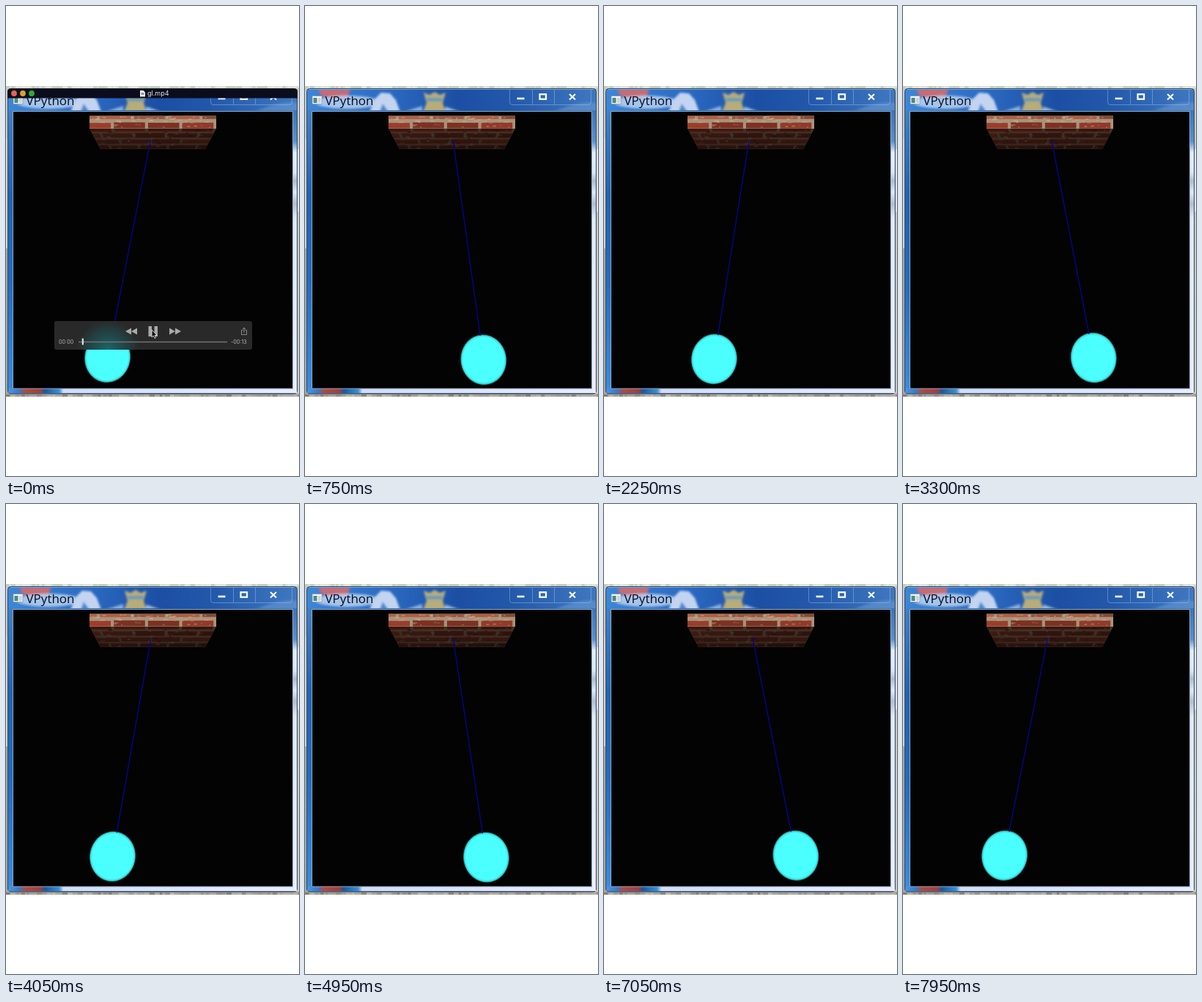
An HTML page for the animation above (8000 ms loop, 400 by 640 pixels).

```html
<!DOCTYPE html>
<html lang="en">
<head>
<meta charset="utf-8">
<title>Pendulum</title>
<style>
  html, body { margin: 0; width: 100%; height: 100%; overflow: hidden; background: #fff; }
  svg { display: block; width: 400px; height: 640px; }
  .title { font: 17px "Open Sans", "Noto Sans", sans-serif; fill: #060d20; }
  .small { font: 7.2px Inter, "Liberation Sans", sans-serif; fill: #b4b4b4; }
  .file { font: 9px Inter, "Liberation Sans", sans-serif; fill: #e4e4e8; }
</style>
</head>
<body>
<svg viewBox="0 0 400 640" xmlns="http://www.w3.org/2000/svg">
  <defs>
    <linearGradient id="bar">
      <stop offset="0" stop-color="#3c86d8"/>
      <stop offset=".3" stop-color="#2a68c0"/>
      <stop offset=".52" stop-color="#1c4fa4"/>
      <stop offset=".7" stop-color="#2257aa"/>
      <stop offset="1" stop-color="#3f78c0"/>
    </linearGradient>
    <linearGradient id="left" x2="0" y2="1">
      <stop offset="0" stop-color="#4080c8"/>
      <stop offset=".3" stop-color="#2264b4"/>
      <stop offset=".6" stop-color="#246cc0"/>
      <stop offset="1" stop-color="#3c8ce0"/>
    </linearGradient>
    <linearGradient id="right" x2="0" y2="1">
      <stop offset="0" stop-color="#3c74bc"/>
      <stop offset=".11" stop-color="#5a90d0"/>
      <stop offset=".15" stop-color="#e4eef8"/>
      <stop offset=".22" stop-color="#dce6f2"/>
      <stop offset=".25" stop-color="#b0bccc"/>
      <stop offset=".29" stop-color="#e2e8f2"/>
      <stop offset=".33" stop-color="#b4bece"/>
      <stop offset=".38" stop-color="#e2e8f2"/>
      <stop offset="1" stop-color="#ececf8"/>
    </linearGradient>
    <linearGradient id="base">
      <stop offset="0" stop-color="#4a94e0"/>
      <stop offset=".035" stop-color="#3878c8"/>
      <stop offset=".055" stop-color="#b8483c"/>
      <stop offset=".11" stop-color="#a83c38"/>
      <stop offset=".125" stop-color="#1c589c"/>
      <stop offset=".175" stop-color="#3c90d4"/>
      <stop offset=".19" stop-color="#d4dcf4"/>
      <stop offset="1" stop-color="#eeecfa"/>
    </linearGradient>
    <linearGradient id="shade" x2="0" y2="1">
      <stop offset="0" stop-color="#000" stop-opacity=".12"/>
      <stop offset="1" stop-color="#000" stop-opacity=".4"/>
    </linearGradient>
    <radialGradient id="skin">
      <stop offset=".88" stop-color="#4cffff"/>
      <stop offset=".95" stop-color="#3cdcdc"/>
      <stop offset="1" stop-color="#0c5050"/>
    </radialGradient>
    <radialGradient id="glow">
      <stop offset="0" stop-color="#1a7274" stop-opacity=".85"/>
      <stop offset=".5" stop-color="#1c5c60" stop-opacity=".6"/>
      <stop offset="1" stop-color="#1c5c60" stop-opacity="0"/>
    </radialGradient>
    <filter id="soft" x="-30%" y="-30%" width="160%" height="160%"><feGaussianBlur stdDeviation="1.800"/></filter>
    <filter id="grain" x="-5%" y="-5%" width="110%" height="110%"><feGaussianBlur stdDeviation=".5"/></filter>
    <clipPath id="head"><rect x="3" y="114" width="394" height="28"/></clipPath>
    <clipPath id="view"><rect x="10" y="144" width="381" height="377"/></clipPath>
    <clipPath id="panel"><rect x="66" y="429" width="270" height="39" rx="3"/></clipPath>
  </defs>

  <!-- desktop -->
  <rect y="109" width="400" height="423" fill="#c8cac0"/>
  <rect y="109" width="400" height="3" fill="#dcded0"/>
  <rect y="180" width="3" height="150" fill="#d6d2c4"/>
  <rect y="330" width="3" height="198" fill="#a8a898"/>
  <rect x="398" y="195" width="2" height="85" fill="#dce4ec"/>
  <rect y="528" width="400" height="4" fill="#a9a598"/>
  <g id="litter"></g>

  <!-- window frame -->
  <rect x="2.500" y="112.500" width="395" height="415.500" rx="4" fill="url(#bar)" stroke="#2c4a6c"/>
  <rect x="3" y="142" width="7" height="385" fill="url(#left)"/>
  <rect x="391" y="142" width="6" height="385" fill="url(#right)"/>
  <rect x="4" y="520" width="392" height="7" fill="url(#base)"/>
  <g clip-path="url(#head)">
    <g filter="url(#soft)">
      <path d="M18 113H62L58 124L36 126L22 122Z" fill="#c46c78"/>
      <ellipse cx="58" cy="131" rx="44" ry="9" fill="#c4d8f2" opacity=".8"/>
      <path d="M88 144L96 126L104 118L116 119L124 128L130 144Z" fill="#c2d4f0"/>
      <path d="M102 144L106 133L114 144Z" fill="#4c88d4"/>
      <path d="M135 144L160 136V146Z" fill="#86aee0"/>
      <path d="M162 118L170 121L177 117L184 121L192 118L188 132L192 144H161L166 132Z" fill="#b8ac78"/>
      <path d="M166 125H188V130H166Z" fill="#6c9cb0"/>
      <path d="M192 137L212 144H190Z" fill="#98b8e0"/>
      <path d="M336 146Q372 128 400 132V146Z" fill="#6698d4" opacity=".6"/>
    </g>
  </g>
  <path d="M6 113.500H394" stroke="#a8cdf0" stroke-opacity=".6"/>
  <g fill="none" stroke="#b4d0ee" stroke-opacity=".4">
    <path d="M279.500 114V131Q279.500 134.500 283 134.500H387Q390.500 134.500 390.500 131V114M310.500 114V134M340.500 114V134"/>
  </g>
  <g fill="none" stroke="#f8fbff">
    <path d="M289.500 126H299.500" stroke-width="2.600"/>
    <rect x="320.500" y="120.200" width="8.500" height="6.600" stroke-width="2.300"/>
    <path d="M361 120L369 127.500M369 120L361 127.500" stroke-width="2.200"/>
  </g>
  <rect x="10" y="122.500" width="13" height="11" fill="#f2f4f4" stroke="#8796a4" stroke-width=".8"/>
  <rect x="11.500" y="125" width="5" height="7" fill="#4c8c80"/>
  <rect x="18" y="125" width="3.500" height="7" fill="#c9d2d6"/>
  <text class="title" x="27.500" y="134.500">VPython</text>
  <rect x="9.500" y="143.500" width="382" height="377.500" fill="#030303" stroke="#88acc4"/>

  <!-- scene -->
  <g clip-path="url(#view)">
    <g id="bricks" filter="url(#grain)"></g>
    <ellipse id="ball" rx="31.500" ry="34.500" fill="url(#skin)"/>
    <path id="rod" stroke="#05058c" stroke-width="1.400" fill="none"/>
  </g>

  <!-- player controls -->
  <g id="player">
    <path d="M2 125.500V117Q2 112.500 6 112.500H394Q398 112.500 398 117V125.500Z" fill="#0b0d1c"/>
    <circle cx="11" cy="119" r="3.900" fill="#ee5f56"/>
    <circle cx="23" cy="119" r="3.900" fill="#dca032"/>
    <circle cx="35" cy="119" r="3.900" fill="#30a83c"/>
    <path d="M183 115H187.500L190 117.500V123.500H183Z" fill="#f0f0f0"/>
    <rect x="184.500" y="118" width="4" height="3" fill="#8898a8"/>
    <text class="file" x="193" y="122.300">gl.mp4</text>
    <g clip-path="url(#panel)">
      <rect x="66" y="429" width="270" height="39" fill="#292929"/>
      <ellipse cx="139" cy="468" rx="43" ry="40" fill="url(#glow)"/>
    </g>
    <g fill="#a9a9a9">
      <path d="M171 438.500V447.500L163 443ZM179 438.500V447.500L171 443Z"/>
      <path d="M223 438.500V447.500L231 443ZM231 438.500V447.500L239 443Z"/>
      <path d="M194.500 436H199V450H194.500ZM202.500 436H207V450H202.500Z"/>
    </g>
    <path d="M323.500 441.500H321.500V447.500H328.500V441.500H326.500M325 445V438M323 440L325 438L327 440" fill="none" stroke="#959595" stroke-width=".9"/>
    <path d="M99 457.500H302" stroke="#717171" stroke-width="1.500"/>
    <rect x="103.700" y="452.500" width="2.300" height="9" rx=".8" fill="#d6d6d6"/>
    <text class="small" x="72" y="460">00:00</text>
    <text class="small" x="307" y="460">-00:13</text>
    <path d="M199 441V451L201.300 449L203 452.500L204.600 451.700L203 448.400H206Z" fill="#111" stroke="#eee" stroke-width=".8"/>
  </g>
</svg>
<script>
const $ = id => document.getElementById(id);

let seed = 11;
const rnd = () => (seed = (seed * 16807) % 2147483647) / 2147483647;

function add(parent, tag, attrs) {
  const el = document.createElementNS("http://www.w3.org/2000/svg", tag);
  for (const k in attrs) el.setAttribute(k, attrs[k]);
  parent.appendChild(el);
}

// specks of wallpaper around the window
for (let x = 0; x < 400; x += 7) {
  const tone = 105 + rnd() * 100 | 0;
  add($("litter"), "rect", { x, y: 529, width: 3 + rnd() * 5, height: 3, fill: `rgb(${tone},${tone - 6},${tone - 20})`, opacity: .6 });
  add($("litter"), "rect", { x, y: 109, width: 3 + rnd() * 5, height: 3, fill: rnd() < .5 ? "#b8c4ae" : "#eceade", opacity: .6 });
}

// beam edges: straight front face, underside narrowing downwards
const inset = y => Math.max(0, y - 167) * 15 / 28;
const at = (u, y) => (114 + inset(y) + u * (173 - 2 * inset(y))).toFixed(1) + " " + y.toFixed(1);
const quad = (u0, u1, y0, y1) => `M${at(u0, y0)}L${at(u1, y0)}L${at(u1, y1)}L${at(u0, y1)}Z`;

function course(y0, y1, offset, rgb) {
  for (let u = offset; u < 1; u += .27) {
    const f = .85 + rnd() * .3;
    const a = Math.max(0, u + .012), b = Math.min(1, u + .258);
    if (b <= a) continue;
    add($("bricks"), "path", {
      d: quad(a, b, y0 + rnd() * .7, y1 - rnd() * .7),
      fill: `rgb(${rgb.map(c => c * f | 0)})`
    });
  }
}

function specks(count, top, bottom, fill) {
  for (let i = 0; i < count; i++) {
    const u = rnd() * .96, y = top + rnd() * (bottom - top - 2);
    add($("bricks"), "path", { d: quad(u, u + .01 + rnd() * .03, y, y + 1 + rnd()), fill, opacity: .25 + rnd() * .4 });
  }
}

const wall = $("bricks");
add(wall, "path", { d: quad(0, 1, 149.5, 167), fill: "#a9927a" });
add(wall, "path", { d: quad(0, 1, 167, 195), fill: "#4c3a2c" });
course(149.5, 154.5, -.2, [158, 86, 64]);
course(158.5, 167, -.09, [146, 58, 42]);
course(167, 171, -.09, [66, 25, 17]);
course(173, 179.5, -.2, [72, 28, 19]);
course(181.5, 187.5, -.06, [68, 26, 18]);
course(189.5, 195, -.17, [64, 24, 16]);
specks(36, 150, 160, "#cdb596");
specks(14, 157, 167, "#b89a7c");
specks(24, 168, 195, "#6c5540");
specks(16, 168, 195, "#200c08");
add(wall, "path", { d: quad(0, 1, 167, 195), fill: "url(#shade)" });

// [ms, swing phase in degrees]
const swing = [[0, 0], [750, 135], [2250, 396], [3300, 553], [4950, 860], [6000, 1052], [7950, 1440]];
const fade = [1, 1, .6, .2];
const LOOP = 8000, STEP = 150;
const pivot = { x: 200.2, y: 169 }, reach = 315.7, sway = 61.6;

function phase(t) {
  let i = 1;
  while (i < swing.length - 1 && t > swing[i][0]) i++;
  const [t0, p0] = swing[i - 1], [t1, p1] = swing[i];
  return (p0 + (p1 - p0) * (t - t0) / (t1 - t0)) * Math.PI / 180;
}

function draw(ms) {
  const n = Math.floor((ms % LOOP) / STEP);
  const angle = Math.asin(-sway * Math.cos(phase(n * STEP)) / reach);
  const sin = Math.sin(angle), cos = Math.cos(angle);
  const along = d => [pivot.x + sin * d, pivot.y + cos * d];
  const [x, y] = along(reach);
  $("rod").setAttribute("d", `M${along(14)}L${along(reach - 33)}`);
  $("ball").setAttribute("transform", `translate(${x} ${y}) rotate(${-angle * 180 / Math.PI})`);
  $("player").setAttribute("opacity", fade[n] || 0);
}

const start = performance.now();
function tick(now) {
  draw(Math.max(0, now - start));
  requestAnimationFrame(tick);
}
draw(0);
requestAnimationFrame(tick);
</script>
</body>
</html>
```
